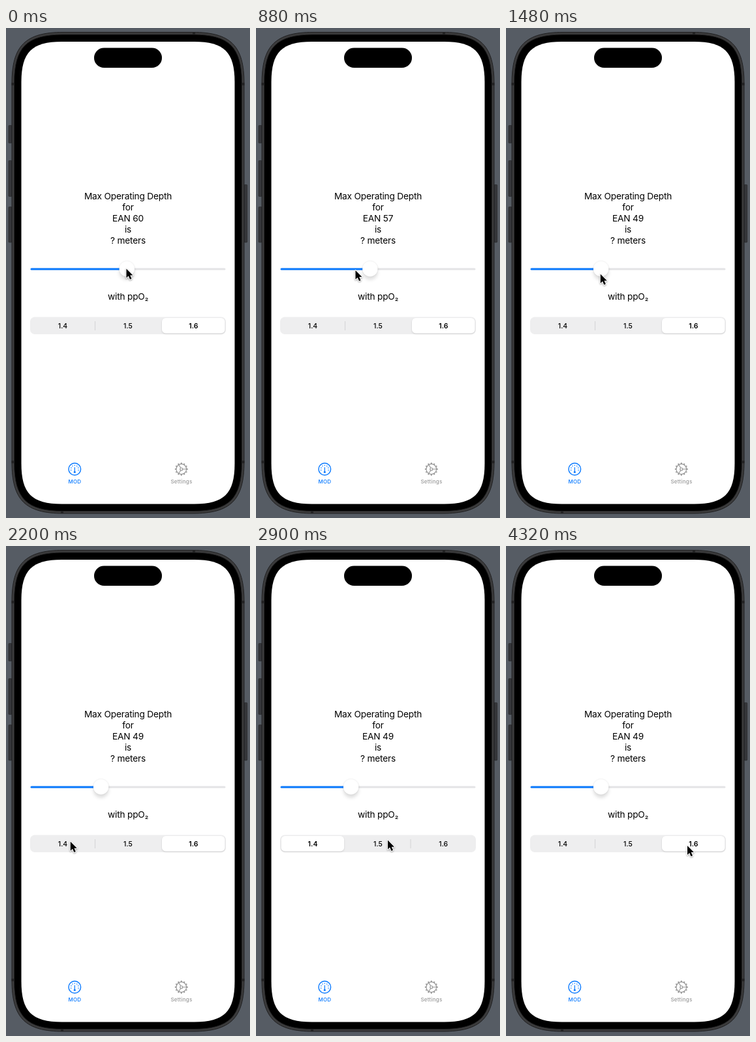
Recreate the animation shown at these times as an HTML page. Size 374x752 px, loop 4.85 s.

```html
<!DOCTYPE html>
<html lang="en">
<head>
<meta charset="utf-8">
<title>Max Operating Depth</title>
<style>
  html, body { margin: 0; width: 100%; height: 100%; overflow: hidden; background: #565c64; }
  svg { display: block; width: 374px; height: 752px; }
  text { font-family: Inter, Roboto, sans-serif; text-anchor: middle; }
  .body text { font-size: 13.7px; letter-spacing: -0.2px; }
  .seg text { font-size: 10.5px; font-weight: 500; }
  .tab { font-size: 8px; font-weight: 500; letter-spacing: 0.2px; }
  #knob { filter: drop-shadow(0 .4px .8px rgba(0,0,0,.12)) drop-shadow(0 5px 2.6px rgba(0,0,0,.12)); }
  #pill { filter: drop-shadow(0 1px 1px rgba(0,0,0,.14)); }
  #cursor { filter: drop-shadow(0 1px 1px rgba(0,0,0,.35)); }
</style>
</head>
<body>
<svg viewBox="0 0 374 752">
  <rect width="374" height="752" fill="#565c64"/>

  <!-- side buttons -->
  <g fill="#35363a" stroke="#242528" stroke-width=".6">
    <rect x="4" y="149.5" width="5" height="27" rx="1"/>
    <rect x="4" y="203.5" width="5" height="55" rx="1"/>
    <rect x="4" y="274.5" width="5" height="54.5" rx="1"/>
    <rect x="365" y="240.5" width="4.7" height="88.5" rx="1"/>
  </g>

  <!-- phone -->
  <path id="frame" fill="#3b3b3c" stroke="#1f1f20"/>
  <g fill="#222223">
    <rect x="286" y="6" width="4" height="5"/><rect x="84" y="740" width="4" height="5"/>
    <rect x="8.5" y="84" width="5" height="4"/><rect x="360.5" y="84" width="5" height="4"/>
    <rect x="8.5" y="664" width="5" height="4"/><rect x="360.5" y="664" width="5" height="4"/>
  </g>
  <path id="bezel" stroke="#252526"/>
  <path id="screen" fill="#fff"/>
  <rect x="135" y="30.5" width="104" height="30.5" rx="15.25" fill="#000"/>

  <g class="body">
    <text x="187" y="262.5">Max Operating Depth</text>
    <text x="187" y="279.5">for</text>
    <text x="187" y="296.5" id="mix">EAN 60</text>
    <text x="187" y="313.5">is</text>
    <text x="187" y="330.5">? meters</text>
    <text x="187" y="416.5">with ppO<tspan font-size="12.5">₂</tspan></text>
  </g>

  <!-- slider -->
  <rect x="37.5" y="368.5" width="299" height="3.1" rx="1.55" fill="#e4e4e6"/>
  <rect x="37.5" y="368.5" width="148" height="3.1" rx="1.55" fill="#0a7aff" id="fill"/>
  <circle cx="185" cy="369.8" r="11.7" fill="#fff" id="knob"/>

  <!-- segmented control -->
  <g class="seg">
    <rect x="37" y="443.5" width="300" height="26.5" rx="7.2" fill="#eeeeef"/>
    <rect x="136" y="450" width="1" height="14" fill="#d4d4d6" id="sepA"/>
    <rect x="236.5" y="450" width="1" height="14" fill="#d4d4d6" id="sepB"/>
    <rect x="239" y="445" width="96.5" height="23.5" rx="5.8" fill="#fff" id="pill"/>
    <text x="87" y="460.8">1.4</text>
    <text x="187" y="460.8">1.5</text>
    <text x="287.3" y="460.8">1.6</text>
  </g>

  <!-- tab bar -->
  <g fill="none" stroke="#0a7aff" stroke-linecap="round">
    <circle cx="105.3" cy="677" r="9.3" stroke-width="1.4"/>
    <path d="M105.3 674.5V681" stroke-width="1.2"/>
    <circle cx="105.3" cy="681.5" r="1.6" fill="#0a7aff" stroke="none"/>
    <path id="dots" stroke-width="1.5"/>
  </g>
  <text class="tab" x="105.4" y="698.8" fill="#0a7aff">MOD</text>
  <g fill="none" stroke="#999" stroke-width="1.2">
    <circle cx="268.8" cy="677" r="7.8"/>
    <circle cx="268.8" cy="677" r="2"/>
    <path id="teeth" stroke-width="2"/>
    <path id="spokes"/>
  </g>
  <text class="tab" x="268.9" y="698.8" fill="#999">Settings</text>

  <g id="cursor">
    <path transform="scale(1.06)" d="M0 0V13.2L3 10.4L5.2 15.4L7.6 14.4L5.4 9.5H9.4Z" fill="#000" stroke="#fff" stroke-width="2" stroke-linejoin="round" paint-order="stroke"/>
  </g>
</svg>

<script>
const $ = id => document.getElementById(id);
const LOOP = 4850, TICKS = 55, TICK = LOOP / TICKS;
const RELEASE = 17;

// pointer moves: first tick, last tick, end x, end y, sideways bow
const home = [184.5, 369.5];
const moves = [
  [0, 3, 137.3, 370],
  [5, 6.6, 222, 370],
  [6.6, 10.6, 148, 372],
  [10.6, 13, 203, 374.5],
  [13, 16, 144.8, 377.8],
  [20, 25, 98.8, 453.8, 25],
  [29, 33, 202, 451.6],
  [37, 41, 278, 460]
];
// segment slides: first tick, from, to
const slides = [[28, 2, 0], [36, 0, 1], [45, 1, 2]];
const labels = document.querySelectorAll('.seg text');

const clamp = v => Math.min(1, Math.max(0, v));
const ease = k => k * k * (3 - 2 * k);

function pointer(n) {
  let [x, y] = home;
  for (const [start, end, toX, toY, bow = 0] of moves) {
    const k = clamp((n - start) / (end - start));
    x += (toX - x) * ease(k) + bow * Math.sin(Math.PI * k);
    y += (toY - y) * ease(k);
  }
  return [x, y];
}

function segment(n) {
  let pos = 2;
  for (const [start, from, to] of slides)
    if (n >= start) pos = from + (to - from) * ease(clamp((n - start + 1) / 5));
  return pos;
}

// evenly spaced radial strokes
function rays(cx, cy, r0, r1, count, step, first = 0) {
  let d = '';
  for (let i = 0; i < count; i++) {
    const a = (first + i * step) * Math.PI / 180, c = Math.cos(a), s = Math.sin(a);
    d += `M${cx + r0 * c} ${cy + r0 * s}L${cx + r1 * c} ${cy + r1 * s}`;
  }
  return d;
}

// rectangle with continuous-curvature corners that reach e along each side
function squircle(x, y, w, h, e) {
  const c = e * 0.74, v = h - 2 * e, u = w - 2 * e;
  return `M${x} ${y + e}c0 ${-c} ${e - c} ${-e} ${e} ${-e}h${u}` +
    `c${c} 0 ${e} ${e - c} ${e} ${e}v${v}` +
    `c0 ${c} ${c - e} ${e} ${-e} ${e}h${-u}` +
    `c${-c} 0 ${-e} ${c - e} ${-e} ${-e}z`;
}

function draw(ms) {
  const n = Math.floor((ms % LOOP) / TICK + 0.23) % TICKS;
  const [x, y] = pointer(n);
  $('cursor').setAttribute('transform', `translate(${x} ${y})`);

  // the knob trails the pointer by one tick until it is let go
  const knob = pointer(Math.min(n, RELEASE) - 1)[0] + 0.8;
  $('knob').setAttribute('cx', knob);
  $('fill').setAttribute('width', knob - 37.5);
  $('mix').textContent = 'EAN ' + Math.round(60 + (knob - 185) / 3.55);

  const pos = segment(n);
  $('pill').setAttribute('x', 38.6 + pos * 100.2);
  $('sepA').setAttribute('opacity', clamp(Math.abs(pos - 0.5) - 0.5));
  $('sepB').setAttribute('opacity', clamp(Math.abs(pos - 1.5) - 0.5));
  labels.forEach((el, i) => el.style.fontWeight = Math.round(pos) === i ? 600 : 500);
}

$('frame').setAttribute('d', squircle(9, 6.5, 356, 738.5, 79));
$('bezel').setAttribute('d', squircle(12.5, 10, 349, 731.5, 74.5));
$('screen').setAttribute('d', squircle(23.5, 21, 327, 709.5, 62));
$('dots').setAttribute('d', rays(105.3, 677, 5.8, 5.85, 7, 35, -195));
$('teeth').setAttribute('d', rays(268.8, 677, 8, 9.9, 12, 30));
$('spokes').setAttribute('d', rays(268.8, 677, 2, 7.8, 3, 120));

const t0 = performance.now();
function loop() {
  draw(performance.now() - t0);
  requestAnimationFrame(loop);
}
loop();
</script>
</body>
</html>
```
